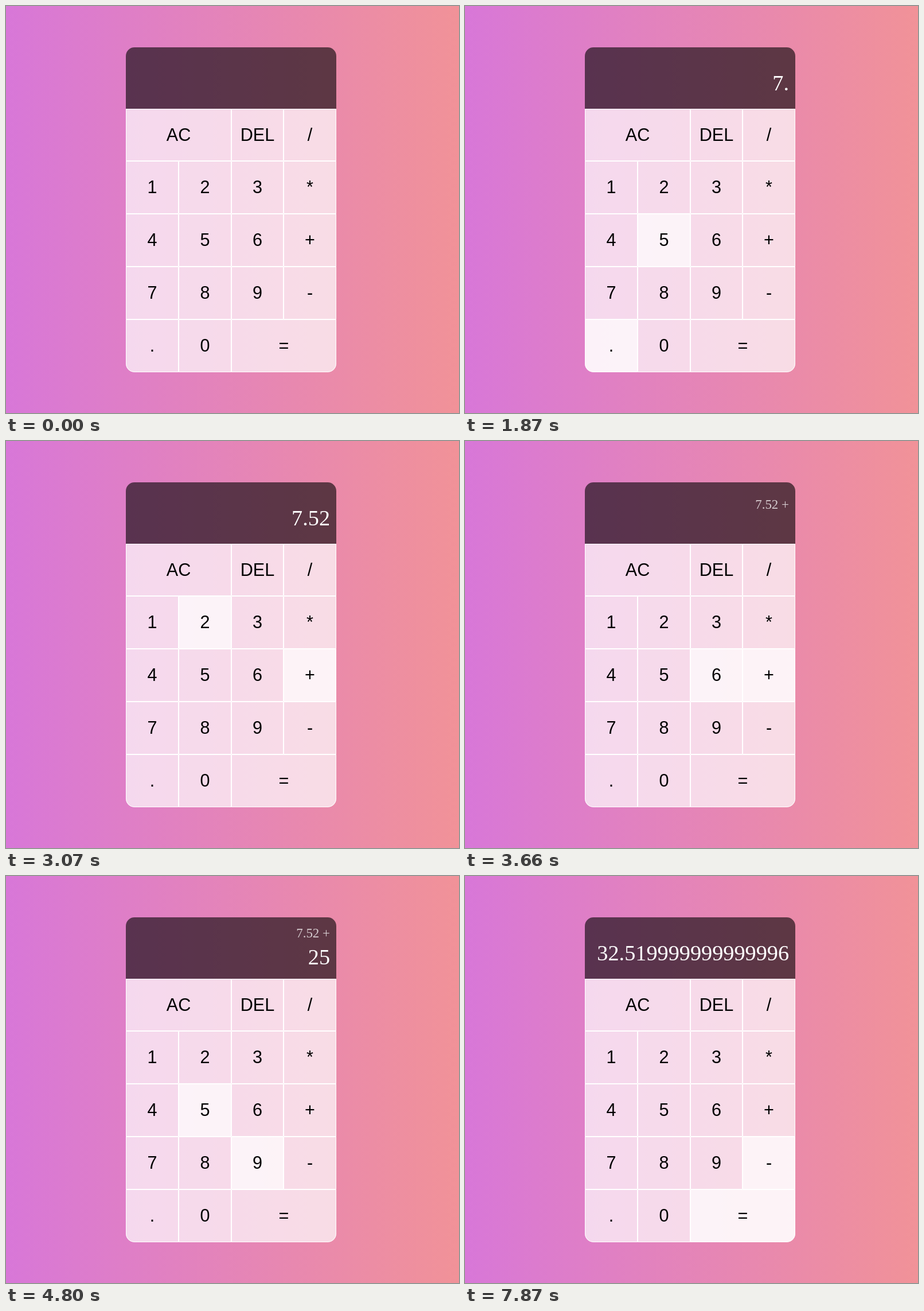
Write an HTML page with a canvas that moves like this. It is 790x709 px and loops after 8000 ms.

```html
<!DOCTYPE html>
<html lang="en">
<head>
<meta charset="utf-8">
<title>Calculator</title>
<style>
html, body { margin: 0; width: 100%; height: 100%; overflow: hidden; }
canvas { display: block; }
</style>
</head>
<body>
<canvas id="stage" width="790" height="709"></canvas>
<script>
const ctx = document.getElementById('stage').getContext('2d');
const W = 790, H = 709, LOOP = 8000, RADIUS = 15;
const COLS = [209, 301, 393, 484, 576];
const ROWS = [179, 270, 362, 454, 546, 638];
const TOP = 72, TEXT_RIGHT = 565;

// label, column, row, column span
const KEYS = [
  ['AC', 0, 0, 2], ['DEL', 2, 0], ['/', 3, 0],
  ['1', 0, 1], ['2', 1, 1], ['3', 2, 1], ['*', 3, 1],
  ['4', 0, 2], ['5', 1, 2], ['6', 2, 2], ['+', 3, 2],
  ['7', 0, 3], ['8', 1, 3], ['9', 2, 3], ['-', 3, 3],
  ['.', 0, 4], ['0', 1, 4], ['=', 2, 4, 2]
];

// Pointer moves to a key (or leaves), presses it, then releases it
const EVENTS = [
  [120, 'hover', '.'], [190, 'hover', ''],
  [590, 'hover', '7'], [1000, 'press', '7'], [1070, 'click', '7'],
  [1270, 'hover', '.'], [1530, 'press', '.'], [1600, 'click', '.'],
  [1730, 'hover', '7'], [1800, 'hover', '8'], [1870, 'hover', '5'],
  [2070, 'press', '5'], [2130, 'click', '5'],
  [2330, 'hover', '2'], [2470, 'press', '2'], [2530, 'click', '2'],
  [2730, 'hover', '5'], [2800, 'hover', '6'], [2870, 'hover', '9'],
  [3000, 'hover', '-'], [3070, 'hover', '+'],
  [3340, 'press', '+'], [3400, 'click', '+'],
  [3660, 'hover', '6'], [3730, 'hover', '3'], [3800, 'hover', '2'],
  [4140, 'press', '2'], [4200, 'click', '2'],
  [4270, 'hover', '5'], [4480, 'press', '5'], [4600, 'click', '5'],
  [4800, 'hover', '9'], [4870, 'hover', '='],
  [5410, 'press', '='], [5470, 'click', '='],
  [7870, 'hover', '-']
];

function click(state, key) {
  if (key === '+') {
    state.previous = state.current;
    state.current = '';
  } else if (key === '=') {
    state.current = String(Number(state.previous) + Number(state.current));
    state.previous = '';
  } else {
    state.current += key;
  }
}

function stateAt(t) {
  const state = { hover: '', focus: '', previous: '', current: '' };
  for (const [time, kind, key] of EVENTS) {
    if (time > t) break;
    if (kind === 'hover') state.hover = key;
    else if (kind === 'press') state.focus = key;
    else click(state, key);
  }
  return state;
}

function panel(x, y, w, h, radii) {
  ctx.beginPath();
  ctx.roundRect(x, y, w, h, radii);
}

function text(str, x, y, font, color, align) {
  ctx.font = font;
  ctx.fillStyle = color;
  ctx.textAlign = align;
  ctx.fillText(str, x, y);
}

function drawKey([label, col, row, span = 1], lit) {
  const x = COLS[col], y = ROWS[row];
  const w = COLS[col + span] - x, h = ROWS[row + 1] - y;
  const br = label === '=' ? RADIUS : 0;
  const bl = label === '.' ? RADIUS : 0;
  panel(x, y, w, h, [0, 0, br, bl]);
  ctx.fillStyle = `rgba(255,255,255,${lit ? 0.9 : 0.7})`;
  ctx.fill();
  panel(x + 0.5, y + 0.5, w - 1, h - 1, [0, 0, br && br - 0.5, bl && bl - 0.5]);
  ctx.strokeStyle = '#fff';
  ctx.lineWidth = 1;
  ctx.stroke();
  text(label, x + w / 2, y + h / 2 + 10,
    '30.6px "Liberation Sans", Arial, sans-serif', '#000', 'center');
}

function drawDisplay({ previous, current }) {
  panel(COLS[0], TOP, COLS[4] - COLS[0], ROWS[0] - TOP, [RADIUS, RADIUS, 0, 0]);
  ctx.fillStyle = 'rgba(0,0,0,0.6)';
  ctx.fill();
  const serif = '"Liberation Serif", "Times New Roman", serif';
  // The two lines push each other apart when both are filled
  text(previous && previous + ' +', TEXT_RIGHT, current ? 107 : 118,
    `22.95px ${serif}`, 'rgba(255,255,255,0.75)', 'right');
  text(current, TEXT_RIGHT, previous ? 153.5 : 147,
    `38.25px ${serif}`, '#fff', 'right');
}

const backdrop = ctx.createLinearGradient(0, 0, W, 0);
backdrop.addColorStop(0, '#d877d8');
backdrop.addColorStop(1, '#f19298');

function frame() {
  const state = stateAt(performance.now() % LOOP);
  ctx.fillStyle = backdrop;
  ctx.fillRect(0, 0, W, H);
  drawDisplay(state);
  for (const key of KEYS) {
    drawKey(key, key[0] === state.hover || key[0] === state.focus);
  }
  requestAnimationFrame(frame);
}
frame();
</script>
</body>
</html>
```
